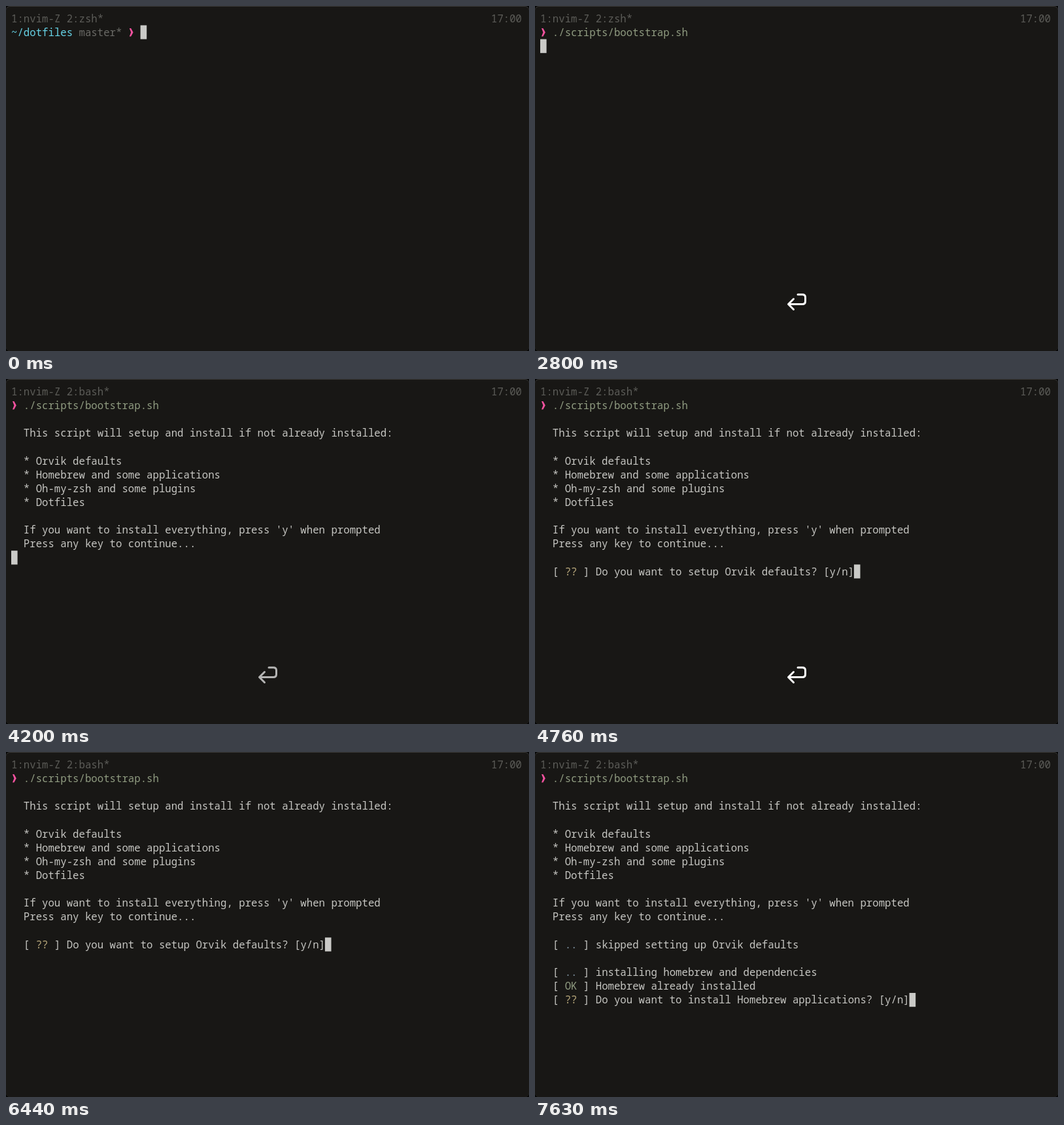
An HTML page for the animation above (8000 ms loop, 800 px wide and 527 px high).

```html
<!DOCTYPE html>
<html lang="en">
<head>
<meta charset="utf-8">
<title>Terminal session</title>
<style>
  html, body { margin: 0; width: 100%; height: 100%; overflow: hidden; background: #050505; }
  svg { display: block; position: absolute; left: 0; top: 0; }
  text {
    font: 15.69px "Noto Sans Mono", "DejaVu Sans Mono", monospace;
    font-variant-ligatures: none;
    white-space: pre;
    fill: #c6c6c2;
  }
  .status { fill: #5c5c58; }
  .branch { fill: #6a6a66; }
  .path { fill: #66d3e6; }
  .ghost { fill: #a3a3a0; }
  .green { fill: #8f9b80; }
  .yellow { fill: #b9a97c; }
  .blue { fill: #7f93a0; }
  .under { fill: #181715; }
  .chevron { fill: #f2529f; }
</style>
</head>
<body>
<svg id="stage" width="800" height="527" viewBox="0 0 800 527">
  <rect width="800" height="527" rx="6" fill="#3a3937"/>
  <rect y="1" width="800" height="526" rx="6" fill="#181715"/>
  <rect id="cursor" width="9.6" height="21.2"/>
  <g id="screen"></g>
  <path id="enter" fill="none" stroke="#fff" stroke-width="3" stroke-linecap="round" stroke-linejoin="round"
    d="M395.5 447.5L387.5 455.5L395.5 463.5M388.5 455.5H409Q413.5 455.5 413.5 451V445Q413.5 440.8 409 440.8H402"/>
</svg>
<script>
const LOOP = 8000, CELL = 9.41, LINE = 21.16, LEFT = 8, TOP = 8.3;
const NS = "http://www.w3.org/2000/svg";
const screen = document.getElementById("screen");
const cursor = document.getElementById("cursor");
const enter = document.getElementById("enter");
const items = [];

const colX = col => LEFT + col * CELL;
const rowY = row => TOP + row * LINE;

function make(tag, attrs, parent) {
  const el = document.createElementNS(NS, tag);
  for (const key in attrs) el.setAttribute(key, attrs[key]);
  return parent.appendChild(el);
}

// Each part is either a plain string or a [class, string] pair.
function line(from, to, row, col, ...parts) {
  const el = make("text", { x: colX(col), y: rowY(row) + 16.4 }, screen);
  for (const part of parts) {
    const [cls, str] = Array.isArray(part) ? part : ["", part];
    make("tspan", { class: cls }, el).textContent = str;
  }
  items.push({ el, from, to });
}

function chevron(from, to, row, col) {
  const el = make("path", {
    class: "chevron",
    d: "M0-6.2H2.4L5.8 0L2.4 6.2H0L2.4 0Z",
    transform: `translate(${colX(col) + 2} ${rowY(row) + 10.8})`
  }, screen);
  items.push({ el, from, to });
}

const tag = (cls, mark) => ["[ ", [cls, mark], " ] "];

const TYPED = 2030, ACCEPT = 2170, VALID = 2380, RUN = 2800, OUTPUT = 2870;
const RENAMED = 3430, ASK = 4760, SKIP = 6930, BREW = 7000, ASK_APPS = 7350;
const command = "./scripts/bootstrap.sh";

line(0, RENAMED, 0, 0, ["status", "1:nvim-Z 2:zsh*"]);
line(RENAMED, LOOP, 0, 0, ["status", "1:nvim-Z 2:bash*"]);
line(0, LOOP, 0, 78, ["status", "17:00"]);

line(0, RUN, 1, 0, ["path", "~/dotfiles"], ["branch", " master*"]);
chevron(0, RUN, 1, 19);
line(TYPED, ACCEPT, 1, 21, ["ghost", "."], ["under", "/"], ["ghost", command.slice(2)]);
line(ACCEPT, VALID, 1, 21, ["ghost", command]);
line(VALID, RUN, 1, 21, ["green", command]);

chevron(RUN, LOOP, 1, 0);
line(RUN, LOOP, 1, 2, ["green", command]);

const intro = {
  3: "This script will setup and install if not already installed:",
  5: "* Orvik defaults",
  6: "* Homebrew and some applications",
  7: "* Oh-my-zsh and some plugins",
  8: "* Dotfiles",
  10: "If you want to install everything, press 'y' when prompted",
  11: "Press any key to continue..."
};
for (const row in intro) line(OUTPUT, LOOP, +row, 2, intro[row]);

line(ASK, SKIP, 13, 2, ...tag("yellow", "??"), "Do you want to setup Orvik defaults? [y/n]");
line(SKIP, LOOP, 13, 2, ...tag("blue", ".."), "skipped setting up Orvik defaults");
line(BREW, LOOP, 15, 2, ...tag("blue", ".."), "installing homebrew and dependencies");
line(ASK_APPS, LOOP, 16, 2, ...tag("green", "OK"), "Homebrew already installed");
line(ASK_APPS, LOOP, 17, 2, ...tag("yellow", "??"), "Do you want to install Homebrew applications? [y/n]");

// time, column, row, colour
const cursorSteps = [
  [0, 21, 1, "#cacac7"],
  [TYPED, 22, 1, "#adadaa"],
  [ACCEPT, 43, 1, "#cacac7"],
  [RUN, 0, 2, "#cacac7"],
  [OUTPUT, 0, 12, "#cacac7"],
  [ASK, 51, 13, "#cacac7"],
  [SKIP, 0, 14, "#cacac7"],
  [BREW, 0, 16, "#cacac7"],
  [ASK_APPS, 60, 17, "#cacac7"]
];

// time, opacity
const keySteps = [
  [0, 0], [2730, .5], [2800, 1],
  [4200, .68], [4270, .36], [4340, .12], [4410, 0],
  [4690, .5], [4760, 1],
  [6090, .6], [6160, .25], [6230, 0]
];

const stepAt = (steps, t) => steps.findLast(s => s[0] <= t);

function draw(t) {
  for (const { el, from, to } of items)
    el.style.display = t >= from && t < to ? "" : "none";
  const [, col, row, fill] = stepAt(cursorSteps, t);
  cursor.setAttribute("x", colX(col));
  cursor.setAttribute("y", rowY(row));
  cursor.setAttribute("fill", fill);
  enter.style.opacity = stepAt(keySteps, t)[1];
}

const start = performance.now();
function tick(now) {
  draw(Math.max(0, now - start) % LOOP);
  requestAnimationFrame(tick);
}
draw(0);
requestAnimationFrame(tick);
</script>
</body>
</html>
```
